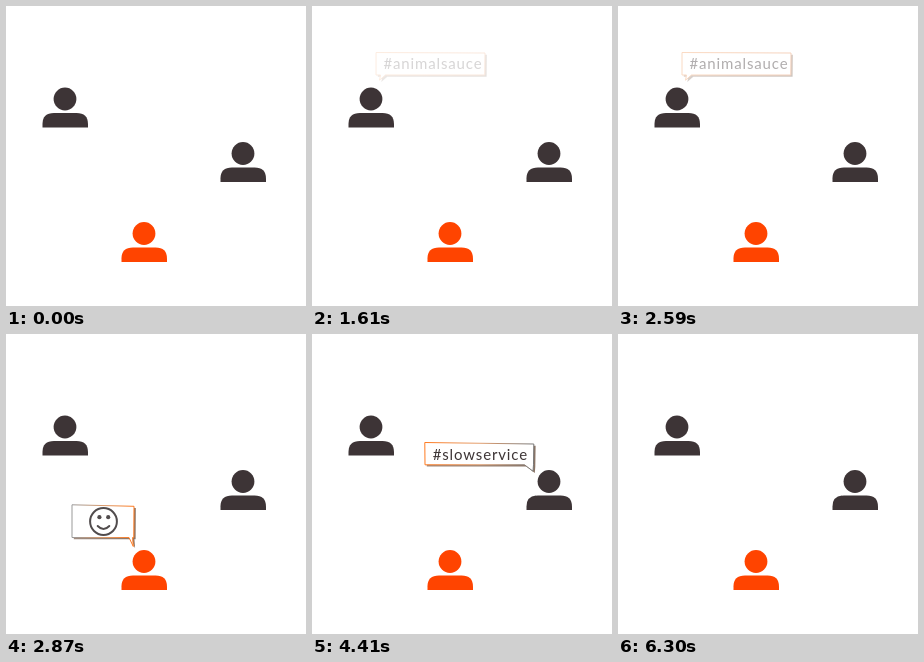
Recreate the animation shown at these times as an HTML page. Size 300 by 300 pixels, loop 7000 ms.

```html
<!DOCTYPE html>
<html lang="en">
<head>
<meta charset="utf-8">
<title>Hashtag chat</title>
<style>
  html, body { margin: 0; width: 100%; height: 100%; overflow: hidden; background: #fff; }
  svg { display: block; width: 100vw; height: 100vh; }
  text { font: 15px Lato, "Open Sans", sans-serif; letter-spacing: .85px; fill: #3d3536; }
  .bubble { opacity: 0; }
  .front { fill: #fff; stroke-width: 1; stroke-linejoin: round; }
  .face { fill: none; stroke: #514c4d; stroke-width: 2; stroke-linecap: round; }
  .eye { fill: #514c4d; stroke: none; }
</style>
</head>
<body>
<svg viewBox="0 0 300 300">
  <defs>
    <linearGradient id="warmLeft">
      <stop offset="0" stop-color="#ff7a1f"/>
      <stop offset=".5" stop-color="#e3a070"/>
      <stop offset="1" stop-color="#777"/>
    </linearGradient>
    <linearGradient id="warmRight">
      <stop offset="0" stop-color="#999"/>
      <stop offset=".5" stop-color="#d99a6c"/>
      <stop offset="1" stop-color="#ff7a1f"/>
    </linearGradient>
    <linearGradient id="warmAll">
      <stop offset="0" stop-color="#f4a56c"/>
      <stop offset="1" stop-color="#e8905a"/>
    </linearGradient>
    <linearGradient id="shade">
      <stop offset="0" stop-color="#a08c80"/>
      <stop offset="1" stop-color="#8a7465"/>
    </linearGradient>
    <g id="person">
      <circle cx="59" cy="93" r="11.4"/>
      <path d="M36.5 121.5V118Q36.5 107 48 107H70.5Q82 107 82 118V121.5Z"/>
    </g>
  </defs>

  <g fill="#3d3436">
    <use href="#person"/>
    <use href="#person" x="178" y="54.5"/>
    <use href="#person" x="79" y="134.5" fill="#ff4400"/>
  </g>
  <g id="bubbles"></g>
</svg>

<script>
const STEP = 70, LOOP = 7000;

const label = (x, y, str) => `<text x="${x}" y="${y}">${str}</text>`;

const face = mouth => `<g class="face">
  <circle cx="97.5" cy="187.5" r="13.4"/>
  <circle class="eye" cx="93.4" cy="183.2" r="2.1"/>
  <circle class="eye" cx="102.2" cy="183.2" r="2.1"/>
  <path d="${mouth}"/></g>`;

const replyBox = top =>
  `M66 ${top}L128 ${top + 1.5}L127.8 203.5H126.6L127.3 212.5L123 203.5H66Z`;

// In and out: [start time, number of steps]
const bubbles = [
  { shape: replyBox(183.5), edge: "warmRight", body: label(73, 199, "#lunch"),
    fadeIn: [70, 5], fadeOut: [910, 5] },
  { shape: "M64 46.5L173 47L172.8 69H73.5L67.5 74.2L68.5 69H64Z", edge: "warmAll",
    body: label(71.5, 63, "#animalsauce"),
    fadeIn: [1610, 5], fadeOut: [2450, 5] },
  { shape: replyBox(170.8), edge: "warmRight",
    body: face("M91.7 192Q97.5 198 103.3 192"),
    fadeIn: [2660, 4], fadeOut: [3500, 5] },
  { shape: "M112.8 108.5L221.8 110L221.5 130.8L221 137.2L212.5 130.8H113Z",
    edge: "warmLeft", body: label(120.7, 125.7, "#slowservice"),
    fadeIn: [4200, 4], fadeOut: [5040, 4] },
  { shape: replyBox(170.8), edge: "warmRight",
    body: face("M92.7 195Q97.5 188.6 102.3 195"),
    fadeIn: [5180, 4], fadeOut: [5880, 7] }
];

const layer = document.getElementById("bubbles");
layer.innerHTML = bubbles.map(b => `<g class="bubble">
  <path d="${b.shape}" transform="translate(1.8 1.8)" fill="url(#shade)"/>
  <path class="front" d="${b.shape}" stroke="url(#${b.edge})"/>
  ${b.body}</g>`).join("");

const progress = (t, [start, steps]) =>
  Math.max(0, Math.min(steps, Math.floor((t - start) / STEP) + 1)) / steps;

const origin = performance.now();

function draw() {
  const t = (performance.now() - origin) % LOOP;
  bubbles.forEach((b, i) => {
    layer.children[i].style.opacity = progress(t, b.fadeIn) - progress(t, b.fadeOut);
  });
  requestAnimationFrame(draw);
}
draw();
</script>
</body>
</html>
```
